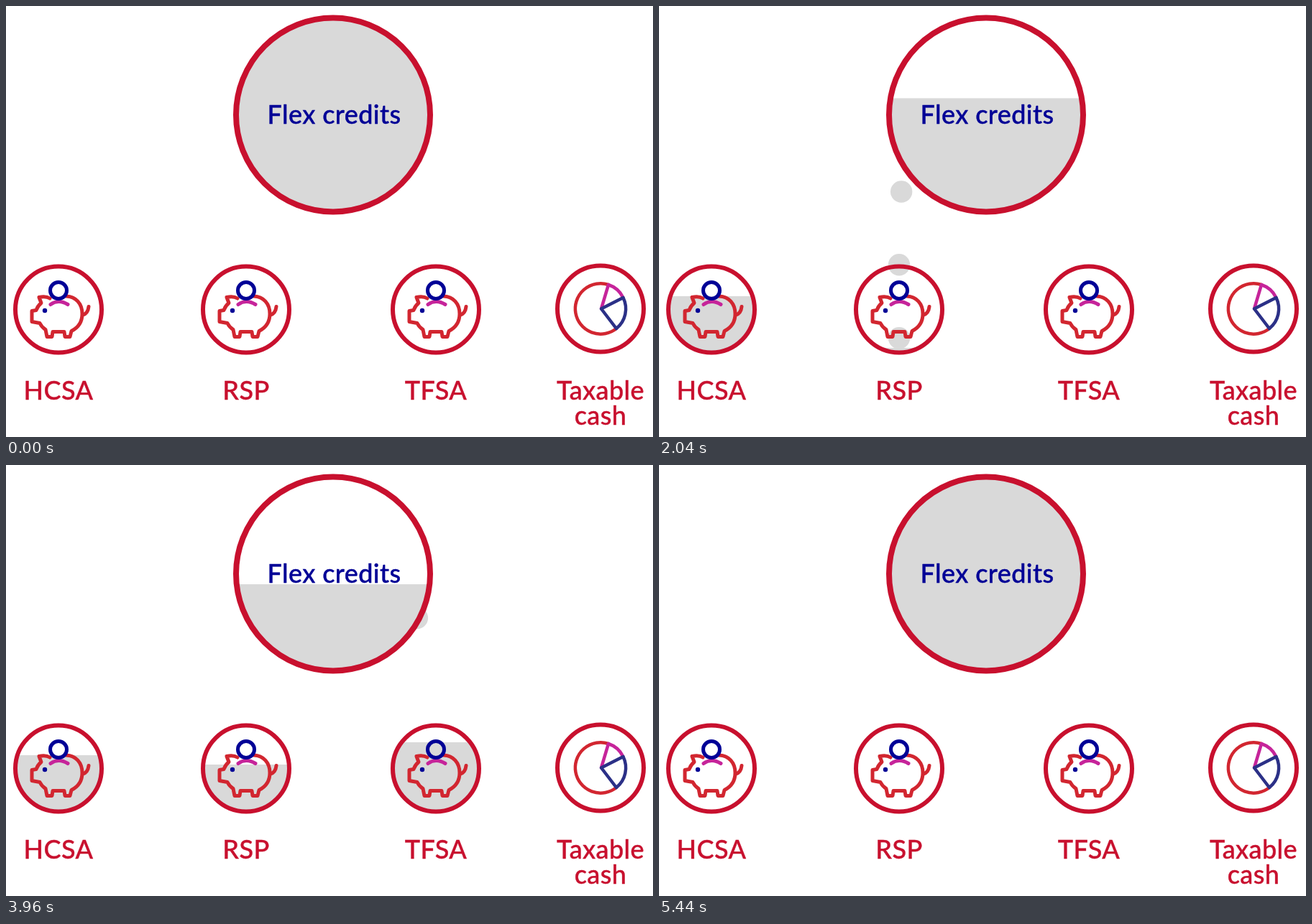
An HTML page with a canvas that plays this animation: 900x600 px, repeating every 5.76 s.

```html
<!DOCTYPE html>
<html lang="en">
<head>
<meta charset="utf-8">
<title>Flex credits</title>
<style>
  html, body { margin: 0; width: 100%; height: 100%; overflow: hidden; background: #fff; }
  canvas { display: block; }
</style>
</head>
<body>
<canvas id="stage" width="900" height="600"></canvas>
<script>
const ctx = document.getElementById('stage').getContext('2d');
const LOOP = 5760, STEP = 40, RESET = 5240, FULL = 16, BOTTOM = 481;
const RED = '#c8102e', ICON_RED = '#d22630', BLUE = '#000096',
      MAGENTA = '#c6249a', NAVY = '#2b3087', GREY = '#d9d9d9';
const POT = { x: 455, y: 151.5, r: 135 };

// drain: pot level change; fill: account level change, both [start, end, from, to]
// dots: [start, spacing, speed in px/ms]
const accounts = [
  { x: 73, y: 422.5, clip: [73, 60], lines: ['HCSA'],
    drain: [60, 640, FULL, 79], fill: [960, 1390, BOTTOM, 404], dots: [106, 195, .41],
    path: 'M370 213H311C283 213 257 215 231 221C204 227 179 237 157 251C110 281 73 325 73 374V465' },
  { x: 334, y: 422.5, clip: [334, 60], lines: ['RSP'],
    drain: [1490, 2080, 79, 132], fill: [2000, 2500, BOTTOM, 417], dots: [1546, 200, .51],
    path: 'M352 213C340 240 334 265 334 290V465' },
  { x: 598, y: 422.5, clip: [596.5, 62], lines: ['TFSA'],
    drain: [2590, 3390, 132, 166], fill: [3060, 3560, BOTTOM, 386], dots: [2650, 190, .52],
    path: 'M556 213C564 240 571 262 578 288C590 325 599 370 599 411V465' },
  { x: 827, y: 421.5, clip: [827, 60], lines: ['Taxable', 'cash'],
    drain: [3960, 4760, 166, 200], fill: [4725, 5110, BOTTOM, 406], dots: [3916, 160, .452],
    path: 'M552 213H572C650 213 726 228 774 273C790 289 801 309 809 331C817 355 823 381 823 407V465' },
];
for (const a of accounts) {
  a.route = document.createElementNS('http://www.w3.org/2000/svg', 'path');
  a.route.setAttribute('d', a.path);
}

// Icon outlines, relative to the centre of their ring
const pigBody = new Path2D('M-12-15.5C-16-18-22-18-27-17L-24-9Q-29-5-31 1L-37 2V17L-26 19Q-23 25-18 28' +
  'L-16 38H-9L-8 31H8L9 38H16L18 30C28 25 33 16 33 6C33-8 24-18 11-18.5M33 8Q41 6 42-4');
const slot = new Path2D('M-11-7Q0-15 13-7');
const pieRed = new Path2D('M22 27.5A35.2 35.2 0 1 1 11-33.5');
const pieMagenta = new Path2D('M1 0L11-33.5A35.2 35.2 0 0 1 31.5-15.5');
const pieNavy = new Path2D('M1 0L31.5-15.5A35.2 35.2 0 0 1 22 27.5Z');

const clamp01 = v => Math.min(1, Math.max(0, v));
const tween = (t, [start, end, from, to]) => from + (to - from) * clamp01((t - start) / (end - start));

function stroke(path, color, width) {
  ctx.strokeStyle = color;
  ctx.lineWidth = width;
  ctx.stroke(path);
}

function circle(x, y, r) {
  const path = new Path2D();
  path.arc(x, y, r, 0, Math.PI * 2);
  return path;
}

function disc(x, y, r, color) {
  ctx.fillStyle = color;
  ctx.fill(circle(x, y, r));
}

function liquid(x, y, r, level, alpha = 1) {
  ctx.save();
  ctx.globalAlpha = alpha;
  ctx.clip(circle(x, y, r));
  ctx.fillStyle = GREY;
  ctx.fillRect(x - r, level, 2 * r, y + r - level);
  ctx.restore();
}

// Dots come to rest at the end of their route, where the rising fill covers them
function drawDots(t, { route, dots: [start, spacing, speed] }) {
  for (let i = 0; i < 3; i++) {
    const age = t - start - i * spacing;
    if (age < 0) continue;
    const p = route.getPointAtLength(age * speed);
    disc(p.x, p.y, 15.2, GREY);
  }
}

function drawPig() {
  stroke(pigBody, ICON_RED, 5);
  stroke(slot, MAGENTA, 5);
  disc(-19, 1.5, 3.2, BLUE);
  stroke(circle(0, -26.5, 11.5), BLUE, 5);
}

function drawPie() {
  stroke(pieRed, ICON_RED, 4.5);
  stroke(pieMagenta, MAGENTA, 4.5);
  stroke(pieNavy, NAVY, 4.5);
}

function label(text, x, y, color) {
  ctx.fillStyle = ctx.strokeStyle = color;
  ctx.lineWidth = .4;
  ctx.fillText(text, x, y);
  ctx.strokeText(text, x, y);
}

function draw(t) {
  ctx.fillStyle = '#fff';
  ctx.fillRect(0, 0, 900, 600);
  ctx.lineJoin = ctx.lineCap = 'round';
  ctx.font = '500 36px Lato, sans-serif';
  ctx.letterSpacing = '0.4px';
  ctx.textAlign = 'center';

  const reset = clamp01((t - RESET) / 200);
  const level = accounts.reduce((sum, a) => sum + tween(t, a.drain) - a.drain[2], FULL);
  if (t < RESET) accounts.forEach(a => drawDots(t, a));
  liquid(POT.x, POT.y, POT.r, level);
  liquid(POT.x, POT.y, POT.r, FULL, reset);
  stroke(circle(POT.x, POT.y, POT.r), RED, 8);
  label('Flex credits', 456.5, 164, BLUE);

  accounts.forEach((a, i) => {
    if (t > a.fill[0]) liquid(a.clip[0], a.y, a.clip[1], tween(t, a.fill), 1 - reset);
    stroke(circle(a.x, a.y, 60), RED, 6);
    ctx.save();
    ctx.translate(a.x, a.y);
    i < 3 ? drawPig() : drawPie();
    ctx.restore();
    a.lines.forEach((text, row) => label(text, a.x, 547.5 + row * 35.5, RED));
  });
}

const begin = performance.now();
function tick() {
  const t = (performance.now() - begin) % LOOP;
  draw(Math.floor(t / STEP) * STEP);
  requestAnimationFrame(tick);
}
tick();
</script>
</body>
</html>
```
